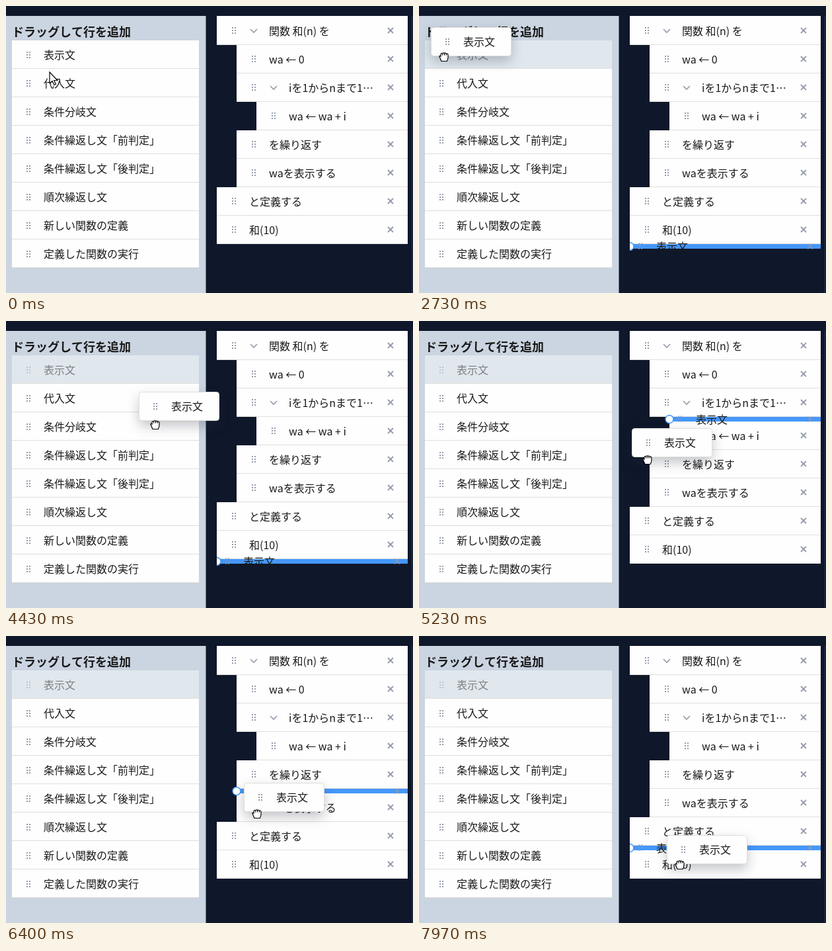
An HTML page with a canvas for the animation above (8 s loop, 616x434 px).

```html
<!DOCTYPE html>
<html lang="ja">
<head>
<meta charset="utf-8">
<style>
html, body { margin: 0; width: 616px; height: 434px; overflow: hidden; background: #0f172a; }
canvas { display: block; }
</style>
</head>
<body>
<canvas id="stage" width="616" height="434"></canvas>
<script>
const c = document.getElementById('stage').getContext('2d');
const FONT = '"Noto Sans CJK JP", "Noto Sans CJK", "Noto Sans", sans-serif';
const LOOP = 8000, DRAG = 2715, TRAIL = 40;
const ROW = 43, BAR = 7, LEFT = 319, RIGHT = 608, TOP = 15;
const DARK = '#0f172a', PANEL = '#cbd5e1', PAPER = '#fefefe', LINE = '#e0dfda';
const INK = '#1a1a1a', GREY = '#949bab', BLUE = '#4597fa';

const palette = ['表示文', '代入文', '条件分岐文', '条件繰返し文「前判定」',
  '条件繰返し文「後判定」', '順次繰返し文', '新しい関数の定義', '定義した関数の実行'];

// text, depth, foldable
const program = [
  ['関数 和(n) を', 0, 1], ['wa ← 0', 1], ['iを1からnまで1…', 1, 1], ['wa ← wa + i', 2],
  ['を繰り返す', 1], ['waを表示する', 1], ['と定義する', 0], ['和(10)', 0]];

// time, pointer x, pointer y
const path = [[0, 66, 100], [30, 66, 100], [830, 41, 79], [1330, 41, 79], [1470, 38, 77],
  [2730, 38, 77], [2830, 39, 78], [3470, 39, 78], [4390, 220, 152], [4430, 226, 157],
  [5190, 341, 207], [5230, 346, 210], [5860, 370, 230], [5900, 371, 237],
  [6930, 389, 299], [6970, 390, 303], [7970, 395, 346], [8000, 395, 346]];

// time, insertion index, depth
const drops = [[DRAG, 8, 0], [5040, 3, 2], [5290, 4, 1], [5930, 5, 1], [6906, 6, 0], [7130, 7, 0]];

const arrow = new Path2D('M0 0V17L4 13.5L7 19.5L9.5 18.3L6.7 12.5H12Z');
const hand = new Path2D('M-4 6.5L-7-.5Q-7.5-2.5-5-1V-4Q-4.5-6-2.5-5Q-1.2-7 .5-5.5Q2-6.6 3.3-4.8Q5.5-5.5 6-3V1Q5.5 4 4.2 6.5Z');
const knuckles = new Path2D('M-2.4-4.5V-2.5M.5-5V-2.5M3.3-4.5V-2.5');

const mix = (a, b, k) => a + (b - a) * k;

// Monotone cubic through the path points.
function coord(t, axis) {
  const slope = i => path[i + 1] && path[i]
    ? (path[i + 1][axis] - path[i][axis]) / (path[i + 1][0] - path[i][0]) : 0;
  const tangent = i => {
    const a = slope(i - 1), b = slope(i);
    return a * b > 0 ? 2 * a * b / (a + b) : 0;
  };
  let i = 0;
  while (i < path.length - 2 && t >= path[i + 1][0]) i++;
  const h = path[i + 1][0] - path[i][0], u = (t - path[i][0]) / h, v = 1 - u;
  return path[i][axis] * (1 + 2 * u) * v * v + path[i + 1][axis] * u * u * (3 - 2 * u)
    + h * u * v * (tangent(i) * v - tangent(i + 1) * u);
}

function rect(x, y, w, h, color) {
  c.fillStyle = color;
  c.fillRect(x, y, w, h);
}

function text(s, x, y, size = 16, weight = 400) {
  c.font = `${weight} ${size}px ${FONT}`;
  c.fillStyle = INK;
  c.fillText(s, x, y);
}

function grip(x, y) {
  for (let i = 0; i < 6; i++) rect(x - 3 + i % 2 * 4, y - 5 + (i >> 1) * 4, 2, 2, GREY);
}

function polyline(width, ...points) {
  c.beginPath();
  points.forEach(([x, y]) => c.lineTo(x, y));
  c.strokeStyle = GREY;
  c.lineWidth = width;
  c.stroke();
}

function cross(x, y) {
  polyline(1.8, [x - 4, y - 4], [x + 4, y + 4]);
  polyline(1.8, [x - 4, y + 4], [x + 4, y - 4]);
}

function drawPalette(dragging) {
  rect(0, TOP, 302.5, 419, PANEL);
  text('ドラッグして行を追加', 9, 46, 18, 700);
  palette.forEach((label, i) => {
    const y = 52 + i * ROW, active = dragging && i === 0;
    rect(9, y, 283, ROW, active ? '#e0e8ee' : PAPER);
    rect(9, y + 42, 283, 1, LINE);
    c.globalAlpha = active ? 0.5 : 1;
    grip(34, y + 22);
    text(label, 57, y + 28);
    c.globalAlpha = 1;
  });
}

function drawProgram(t) {
  const n = drops.filter(d => d[0] <= t).length - 1;
  const now = drops[n], before = drops[Math.max(0, n - 1)];
  const u = now ? Math.min(1, (t - now[0]) / 150) : 0, k = u * u * (3 - 2 * u);
  const shift = (i, drop) => drop && i >= drop[1] ? BAR : 0;
  const first = TOP + 1;

  c.save();
  c.beginPath();
  c.rect(LEFT, 0, RIGHT - LEFT, 434);
  c.clip();
  rect(LEFT, TOP, RIGHT - LEFT, 1, PAPER);
  program.forEach(([label, depth, fold], i) => {
    const x = LEFT + depth * 30;
    const y = Math.round(first + i * ROW + mix(shift(i, before), shift(i, now), k));
    rect(x, y, RIGHT - x, ROW, PAPER);
    rect(x, y + 42, RIGHT - x, 1, LINE);
    grip(x + 26, y + 21);
    if (fold) polyline(1.6, [x + 51, y + 19], [x + 56, y + 24], [x + 61, y + 19]);
    text(label, x + (fold ? 79 : 49), y + 28);
    cross(582, y + 21);
  });
  if (now) drawBar(LEFT + now[2] * 30, Math.round(first + ROW * mix(before[1], now[1], k)));
  c.restore();
}

function drawBar(x, y) {
  const mid = y + BAR / 2;
  rect(x, y, RIGHT - x, BAR, BLUE);
  c.globalAlpha = 0.6;
  grip(x + 16, y + 3);
  cross(592, mid);
  c.globalAlpha = 1;
  text('表示文', x + 40, y + 10);
  c.beginPath();
  c.arc(x, mid, 6, 0, 7);
  c.fillStyle = PAPER;
  c.fill();
  c.strokeStyle = BLUE;
  c.lineWidth = 1.5;
  c.stroke();
}

function drawCard(x, y) {
  c.save();
  c.shadowColor = 'rgba(40, 45, 60, .28)';
  c.shadowBlur = 18;
  c.shadowOffsetY = 8;
  c.beginPath();
  c.roundRect(x + .5, y + .5, 121, 43, 4);
  c.fillStyle = PAPER;
  c.fill();
  c.restore();
  c.strokeStyle = LINE;
  c.lineWidth = 1;
  c.stroke();
  grip(x + 25, y + 22);
  text('表示文', x + 49, y + 28);
}

function drawPointer(x, y, dragging) {
  const shape = x > 46 && !dragging ? arrow : hand;
  c.save();
  c.translate(x, y);
  if (shape === hand && !dragging) c.scale(1, 1.15);
  c.fillStyle = '#fff';
  c.strokeStyle = '#000';
  c.lineWidth = 1.2;
  c.fill(shape);
  c.stroke(shape);
  if (shape === hand) c.stroke(knuckles);
  c.restore();
}

function draw() {
  const t = performance.now() % LOOP, dragging = t >= DRAG;
  rect(0, 0, 616, 434, DARK);
  rect(614, TOP, 1, 419, '#22345a');
  drawPalette(dragging);
  drawProgram(t);
  // The card trails slightly behind the pointer.
  if (dragging) drawCard(Math.round(coord(t - TRAIL, 1) - 19.6), Math.round(coord(t - TRAIL, 2) - 45));
  drawPointer(Math.round(coord(t, 1)), Math.round(coord(t, 2)), dragging);
  requestAnimationFrame(draw);
}
draw();
</script>
</body>
</html>
```
